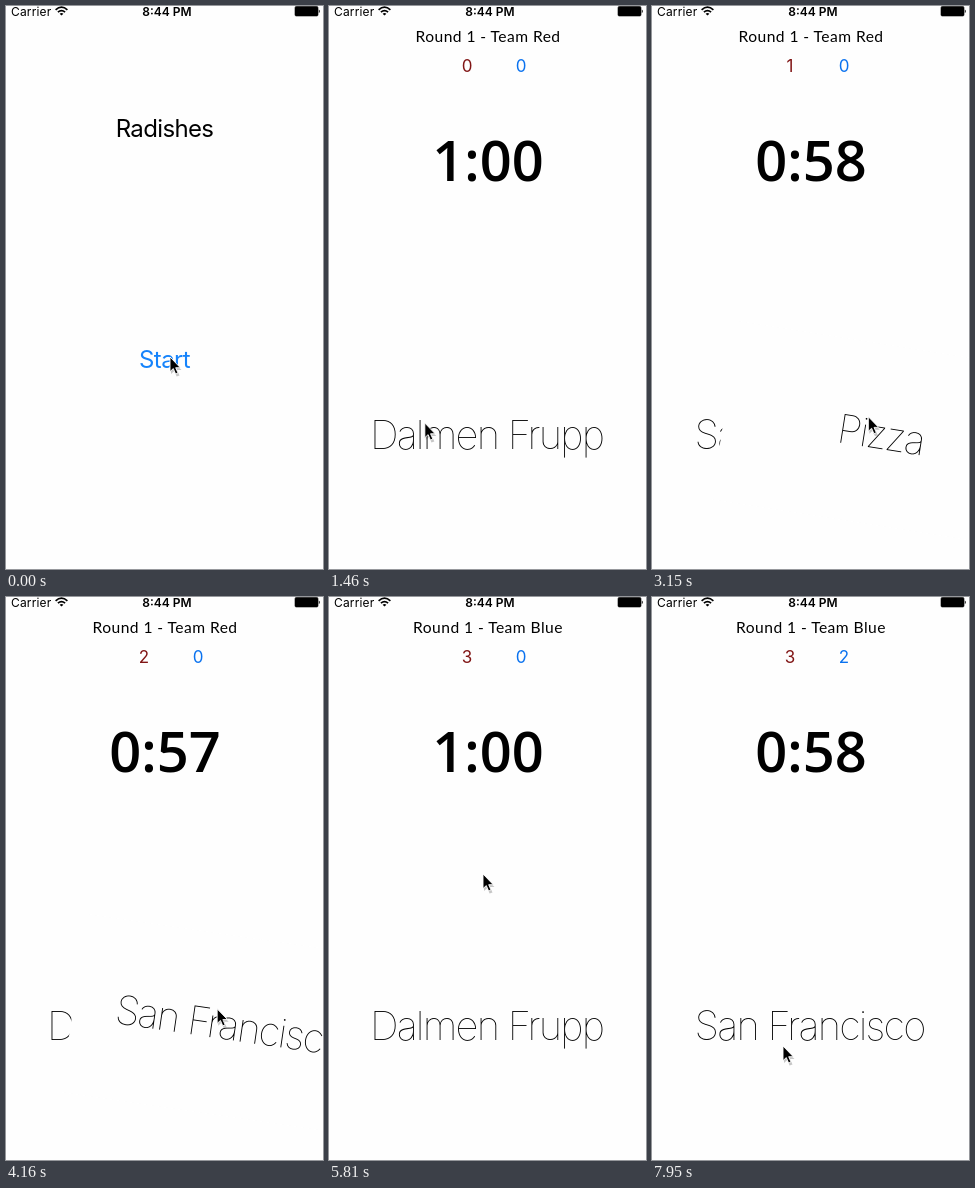
An HTML page for the animation above (8000 ms loop, 317 px wide and 563 px high).

```html
<!DOCTYPE html>
<html lang="en">
<head>
<meta charset="utf-8">
<title>Word game</title>
<style>
  html, body { margin: 0; width: 100%; height: 100%; overflow: hidden; background: #fefefe; }
  svg { display: block; width: 317px; height: 563px; font-family: Inter, "Open Sans", sans-serif; }
  text { text-anchor: middle; }
  .paper { fill: #fefefe; }
  .status text { font-size: 12px; }
  .heading { font-size: 24px; letter-spacing: -.65px; }
  .button { fill: #1583fb; }
  .title { font: 15.6px Lato, sans-serif; letter-spacing: .45px; }
  .score { font-size: 17px; }
  .timer { font: 600 56px "Open Sans", sans-serif; }
  .word { font-size: 40px; font-weight: 100; letter-spacing: -1.8px; }
</style>
</head>
<body>
<svg viewBox="0 0 317 563">
  <rect class="paper" width="317" height="563"/>
  <text class="heading" x="158.5" y="131">Radishes</text>
  <text class="heading button" id="start" x="158.5" y="362">Start</text>

  <g id="game">
    <rect class="paper" width="317" height="563"/>
    <text class="title" id="title" x="159" y="36"></text>
    <text class="score" id="red" x="138" y="66" fill="#801515"></text>
    <text class="score" id="blue" x="192" y="66" fill="#0a72ef"></text>
    <text class="timer" id="timer" x="159" y="175"></text>
    <text class="button" id="ready" x="158.5" y="282" font-size="22">Ready</text>
    <text class="word" id="nextWord" x="157.5" y="443"></text>
    <g id="card">
      <rect class="paper" y="339" width="317" height="180"/>
      <text class="word" id="word" x="157.5" y="443"></text>
    </g>
  </g>

  <g class="status">
    <text x="5" y="10" style="text-anchor:start" letter-spacing=".15">Carrier</text>
    <g fill="none" stroke="#000" stroke-width="1.7">
      <path d="M49.6 3.8Q55.5-1.4 61.4 3.8M51.9 6.2Q55.5 3 59.1 6.2"/>
      <path d="M55.5 9.6L53.6 7.7Q55.5 6.2 57.4 7.7Z" fill="#000" stroke="none"/>
    </g>
    <text x="161" y="10" font-weight="600">8:44 PM</text>
    <rect x="289" y=".5" width="23" height="9.5" rx="1.2" stroke="#000" stroke-width=".6"/>
    <path d="M312.8 3.6q2 1.7 0 3.6z"/>
  </g>

  <g id="cursor">
    <path d="M1 2.5V17L4.3 14L6.6 19.5L9.5 18.5L7 13H11.5Z" opacity=".22"/>
    <path d="M0 0V14.6L3.3 11.6L5.6 17L8 16L5.7 10.7H10.3Z" stroke="#fff" stroke-width=".9"/>
  </g>
</svg>

<script>
const LOOP = 8000, STEP = 58.6;
const OPENED = 770, READY_TAPPED = 5800;
const SWIPE_TIME = 140, GRAB_X = 145;
const PERSON = "Dalmen Frupp", FOOD = "Pizza", CITY = "San Francisco";
const WORDS = [PERSON, FOOD, CITY, PERSON, PERSON, CITY];
const SWIPES = [1570, 3075, 4075, 6855, 7480];

// Pointer glides; a higher arc delays the vertical part
const glide = (from, time, x, y, arc = 1) => ({ from, time, x, y, arc });
const swipe = i => [
  glide(SWIPES[i] - 450, 350, 95, 418),
  glide(SWIPES[i], SWIPE_TIME, 285, 374, 4)
];
const GLIDES = [
  glide(230, 120, 154, 351),
  ...swipe(0), glide(1710, 150, 254, 404),
  ...swipe(1), ...swipe(2),
  glide(4520, 200, 183, 312), glide(4870, 460, 154, 277),
  glide(5940, 330, 252, 376),
  ...swipe(3), ...swipe(4), glide(7620, 300, 131, 449)
];

const el = Object.fromEntries([...document.querySelectorAll("[id]")].map(e => [e.id, e]));
const move = (node, x, y, more = "") =>
  node.setAttribute("transform", `translate(${x.toFixed(2)} ${y.toFixed(2)}) ${more}`);
const setText = (id, value) => { el[id].textContent = value; };

function pointer(t) {
  let x = 164, y = 351;
  for (const g of GLIDES) {
    const k = Math.min(1, Math.max(0, (t - g.from) / g.time));
    x += (g.x - x) * k;
    y += (g.y - y) * k ** g.arc;
  }
  return [x, y];
}

// Critically damped slide from the bottom edge
function slide(t) {
  const s = Math.max(0, t - 738) * .0223;
  return 563 * (1 + s) * Math.exp(-s);
}

function secondsLeft(t) {
  const roundEnd = SWIPES[2] + SWIPE_TIME;
  const elapsed = t < READY_TAPPED ? Math.min(t, roundEnd) - OPENED : t - READY_TAPPED;
  return 60 - Math.max(0, Math.floor(elapsed / 1000));
}

// Buttons dim while pressed
const buttonOpacity = (t, press, release) => t >= press && t < release ? .2 : 1;

function draw(time) {
  const t = Math.floor((time % LOOP + 22) / STEP) * STEP;
  const [x, y] = pointer(t);
  const done = SWIPES.filter(s => t >= s + SWIPE_TIME).length;
  const dragging = t >= SWIPES[done];
  const dx = dragging ? Math.max(0, x - GRAB_X) : 0;
  const left = secondsLeft(t);
  const waiting = done === 3 && t < READY_TAPPED;

  move(el.cursor, x, y);
  move(el.game, 0, slide(t));
  move(el.card, dx, 0, `rotate(${dx * .126} 158.5 429)`);

  setText("title", `Round 1 - Team ${done < 3 ? "Red" : "Blue"}`);
  setText("red", Math.min(done, 3));
  setText("blue", Math.max(done - 3, 0));
  setText("timer", left === 60 ? "1:00" : `0:${left}`);
  setText("word", WORDS[done]);
  setText("nextWord", dx ? WORDS[done + 1] : "");

  el.start.style.opacity = buttonOpacity(t, 580, 750);
  el.ready.style.opacity = waiting ? buttonOpacity(t, 5620, READY_TAPPED) : 0;
}

function tick() {
  draw(performance.now());
  requestAnimationFrame(tick);
}
tick();
</script>
</body>
</html>
```
